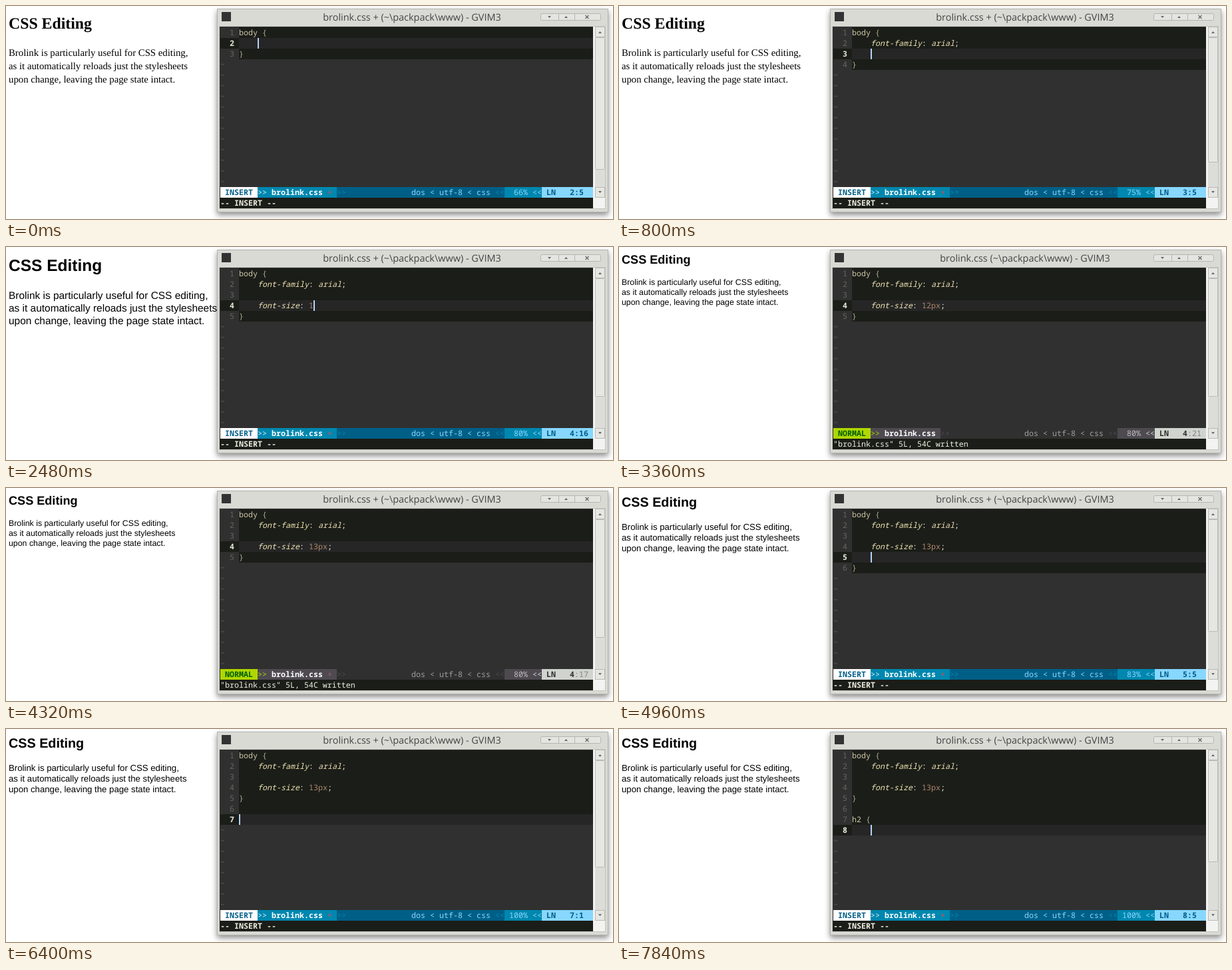
Recreate the animation shown at these times as an HTML page. Size 912 by 320 pixels, loop 8 s.

```html
<!DOCTYPE html>
<html lang="en">
<head>
<meta charset="utf-8">
<title>CSS Editing</title>
<style>
  html, body { margin: 0; width: 100%; height: 100%; overflow: hidden; background: #fff; }
  svg { display: block; width: 912px; height: 320px; }
  text { white-space: pre; text-rendering: geometricPrecision; }
  .mono { font: 11.667px "Noto Sans Mono", "DejaVu Sans Mono", monospace; }
  .title { font: 14.45px "Open Sans", "Noto Sans", sans-serif; fill: #444; text-anchor: middle; }
  .b { font-weight: bold; }
  .i { font-style: italic; }
  .window { filter: drop-shadow(0 4px 4px rgba(0, 0, 0, .45)); }
</style>
</head>
<body>
<svg viewBox="0 0 912 320">
  <g id="page" fill="#000"></g>
  <rect class="window" x="317" y="4" width="588" height="306" fill="#dadad5"/>
  <rect x="317.5" y="4.5" width="587" height="305" fill="none" stroke="#b4b4ae"/>
  <rect x="324" y="9" width="14" height="14" fill="#333"/>
  <g fill="#e4e4e0" stroke="#b6b6b1">
    <rect x="803.5" y="11.5" width="90" height="10" rx="2"/>
    <path d="M830.5 12v9M854.5 12v9"/>
  </g>
  <path d="M814 15h5l-2.5 3zM839 18h5l-2.5 -3z" fill="#666"/>
  <path d="M870.5 14l5 5m0 -5l-5 5" stroke="#666" stroke-width="1.3"/>
  <rect x="320" y="30" width="581" height="275" fill="#c6c6c0"/>
  <rect x="321" y="31" width="562" height="273" fill="#303030"/>
  <rect x="882" y="31" width="18" height="273" fill="#f3f3f1"/>
  <rect x="885" y="31" width="15" height="257" fill="#dcdcd9"/>
  <g fill="#e6e6e3" stroke="#b9b9b5">
    <rect x="885.5" y="31.5" width="14" height="15"/>
    <rect x="885.5" y="272.5" width="14" height="15"/>
    <rect id="thumb" x="885.5" y="47.5" width="14" rx="1"/>
  </g>
  <path d="M890 41h5l-2.5 -3zM890 278h5l-2.5 3z" fill="#666"/>
  <text id="title" class="title" x="610" y="22"></text>
  <g id="editor" class="mono"></g>
</svg>
<script>
const LOOP = 8000, CW = 7, ROW = 16, LEFT = 322, TOP = 32, CODE = 350;
const DARK = '#1b1d18', GREY = '#303030';
const $ = id => document.getElementById(id);

// font, heading size and baseline, text size, first baseline, line pitch
const SANS = "'Liberation Sans', Arial, sans-serif";
const PAGES = [
  ["'Liberation Serif', 'Times New Roman', serif", 23.8, 34, 14.77, 75, 20],
  [SANS, 24.5, 36, 15.45, 78, 19],
  [SANS, 18.1, 25, 12.35, 57, 15],
  [SANS, 19.8, 28, 13.2, 63, 16]
];
const COPY = [
  'Brolink is particularly useful for CSS editing,',
  'as it automatically reloads just the stylesheets',
  'upon change, leaving the page state intact.'
];

const THEMES = {
  INSERT: { tag: '#fff', tagInk: '#005f87', mid: '#0087af', arrow: '#d7f2ff', plus: '#e04848',
            bar: '#005f87', ink: '#87d7ff', pct: '#87d7ff', end: '#87d7ff', endInk: '#005f87', colInk: '#005f87' },
  NORMAL: { tag: '#afd700', tagInk: '#005f00', mid: '#4e4a50', arrow: '#afd700', plus: '#a06060',
            bar: '#303030', ink: '#9e9e9e', pct: '#bcbcbc', end: '#d0d4ce', endInk: '#303030', colInk: '#808080' }
};

// ---- timeline ----
const PAD = '    ', FAMILY = 'font-family: arial;', SIZE = 'font-size: ';
const frames = [];
let now = {};
function at(t, change) {
  now = { ...now, on: true, lag: 0, ...change };
  frames.push({ t, ...now });
}
function line(t, row, text, more) {
  const lines = [...now.lines];
  lines[row] = text;
  at(t, { lines, row, col: text.length, ...more });
}
function blink(...times) {
  times.forEach((t, i) => at(t, { on: i % 2 === 1 }));
}
const insert = { mode: 'INSERT', msg: '-- INSERT --', dirty: true };
const written = size => ({ mode: 'NORMAL', msg: `"brolink.css" ${size} written`, dirty: false });

at(0, { lines: ['body {', PAD, '}'], row: 1, col: 4, page: 0, ...insert });
for (let i = 1; i < 10; i++) line(80 * i, 1, PAD + FAMILY.slice(0, Math.ceil(i * 19 / 9)));
const top3 = ['body {', PAD + FAMILY, ''];
at(800, { lines: [...top3, '}'], row: 2, col: 4 });
at(960, { mode: 'NORMAL', msg: '', col: 0 });
at(1040, { page: 1, ...written('4L, 33C') });
at(1280, { lines: [...top3, PAD, '}'], row: 3, col: 4, ...insert });
blink(1520, 1600);
line(1760, 3, PAD + 'f');
[2, 4, 7, 9, 11].forEach((n, i) => line(2000 + 80 * i, 3, PAD + SIZE.slice(0, n)));
line(2480, 3, PAD + SIZE + '1', { lag: 1 });
line(2560, 3, PAD + SIZE + '12');
line(2640, 3, PAD + SIZE + '12px');
line(2800, 3, PAD + SIZE + '12px;');
blink(2960, 3040);
at(3200, { page: 2, ...written('5L, 54C') });
blink(3360, 3440);
for (let i = 0; i < 4; i++) at(3600 + 80 * i, { col: 19 - i });
line(4000, 3, PAD + SIZE + '13px;', { col: 16, dirty: true });
blink(4320);
at(4400, { page: 3, dirty: false });
blink(4640, 4720);
const rule = now.lines, head = rule.slice(0, 4);
at(4880, { ...insert, col: 20 });
at(4960, { lines: [...head, PAD, '}'], row: 4, col: 4 });
at(5040, { lines: [...head, '', PAD, '}'], row: 5 });
for (let i = 0; i < 4; i++) at(5280 + 80 * i, { col: 3 - i });
at(5600, { lines: [...head, '', '}'], row: 4, col: 0 });
at(5680, { lines: rule, row: 3, col: 20 });
at(5840, { mode: 'NORMAL', msg: '' });
at(5920, written('5L, 54C'));
line(6080, 5, '', insert);
line(6160, 6, '');
blink(6320, 6400, 6560, 6640);
for (let i = 1; i < 5; i++) line(6720 + 80 * i, 6, 'h2 {'.slice(0, i));
line(7200, 7, '');
line(7360, 7, PAD);
blink(7600, 7680, 7760, 7840);

// ---- drawing ----
const esc = s => s.replace(/&/g, '&amp;').replace(/</g, '&lt;');
const rect = (x, y, w, h, fill) => `<rect x="${x}" y="${y}" width="${w}" height="${h}" fill="${fill}"/>`;
const text = (x, y, s, fill, cls = '') => `<text x="${x}" y="${y}" fill="${fill}" class="${cls}">${esc(s)}</text>`;

function tokenStyle(token, indented) {
  if (/^font-(family|size)$/.test(token)) return ['#eee4b2', 'i'];
  if (token === 'arial') return ['#e8dab0', 'i'];
  if (/^\d/.test(token)) return ['#ad866c'];
  if (/^[{}]$/.test(token)) return ['#aca890'];
  return [indented ? '#f4f2e2' : '#cec7a6'];
}

function codeLine(s, y) {
  return [...s.matchAll(/[\w-]+|[^\s\w]/g)]
    .map(m => text(CODE + m.index * CW, y, m[0], ...tokenStyle(m[0], s[0] === ' ')))
    .join('');
}

function buffer(s) {
  let out = '';
  for (let i = 0; i < 15; i++) {
    const y = TOP + i * ROW, base = y + 12, here = i === s.row;
    if (i >= s.lines.length) {
      out += text(LEFT, base, '~', '#5c5c5c');
      continue;
    }
    out += rect(LEFT, y, 28, ROW, here ? DARK : GREY)
      + rect(CODE, y, 532, ROW, here ? '#262626' : DARK)
      + text(336, base, String(i + 1), here ? '#e8e8dc' : '#66665f', here ? 'b' : '')
      + codeLine(s.lines[i], base);
  }
  if (s.on) {
    const x = CODE + s.col * CW, y = TOP + s.row * ROW, block = s.mode === 'NORMAL';
    out += rect(x, y, block ? CW : 2, ROW, '#b4d4f8');
    if (block) out += text(x, y + 12, s.lines[s.row][s.col] || '', DARK);
  }
  return out;
}

function statusLine(s) {
  const c = THEMES[s.mode], y = 272;
  const seg = (from, to, fill) => rect(LEFT + from * CW, y, (to - from) * CW, ROW, fill);
  const put = (col, str, fill, cls) => text(LEFT + col * CW, y + 12, str, fill, cls);
  const nameEnd = s.dirty ? 25 : 23;
  const percent = Math.floor(100 * (s.row + 1) / s.lines.length) + '%';
  const row = String(s.row + 1);
  return seg(0, 80, c.bar) + seg(0, 8, c.tag) + seg(8, nameEnd, c.mid)
    + seg(61, 69, c.mid) + seg(69, 80, c.end)
    + put(1, s.mode, c.tagInk, 'b') + put(8, '>>', c.arrow)
    + put(11, 'brolink.css', '#fff', 'b') + (s.dirty ? put(23, '+', c.plus) : '')
    + put(nameEnd, '>>', c.mid) + put(41, 'dos < utf-8 < css', c.ink) + put(59, '<<', c.mid)
    + put(66 - percent.length, percent, c.pct) + put(67, '<<', c.end)
    + put(70, 'LN', c.endInk, 'b') + put(75, row, c.endInk, 'b')
    + put(75 + row.length, ':' + (s.col + 1 - s.lag), c.colInk, s.mode === 'INSERT' ? 'b' : '');
}

function drawPage(n) {
  const [font, hSize, hY, size, y, pitch] = PAGES[n];
  $('page').style.fontFamily = font;
  $('page').innerHTML = `<text x="4" y="${hY}" font-size="${hSize}" class="b">CSS Editing</text>`
    + COPY.map((s, i) => `<text x="4" y="${y + i * pitch}" font-size="${size}">${s}</text>`).join('');
}

function draw(s) {
  drawPage(s.page);
  $('title').textContent = `brolink.css ${s.dirty ? '+ ' : ''}(~\\packpack\\www) - GVIM3`;
  $('thumb').setAttribute('height', Math.round(225 * 15 / (14 + s.lines.length)) - 1);
  $('editor').innerHTML = buffer(s) + statusLine(s)
    + rect(321, 288, 561, ROW, DARK)
    + text(LEFT, 300, s.msg, '#f0efe2', s.mode === 'INSERT' ? 'b' : '');
}

let shown;
function tick() {
  const t = performance.now() % LOOP;
  const frame = frames.findLast(f => f.t <= t);
  if (frame !== shown) draw(shown = frame);
  requestAnimationFrame(tick);
}
tick();
</script>
</body>
</html>
```
